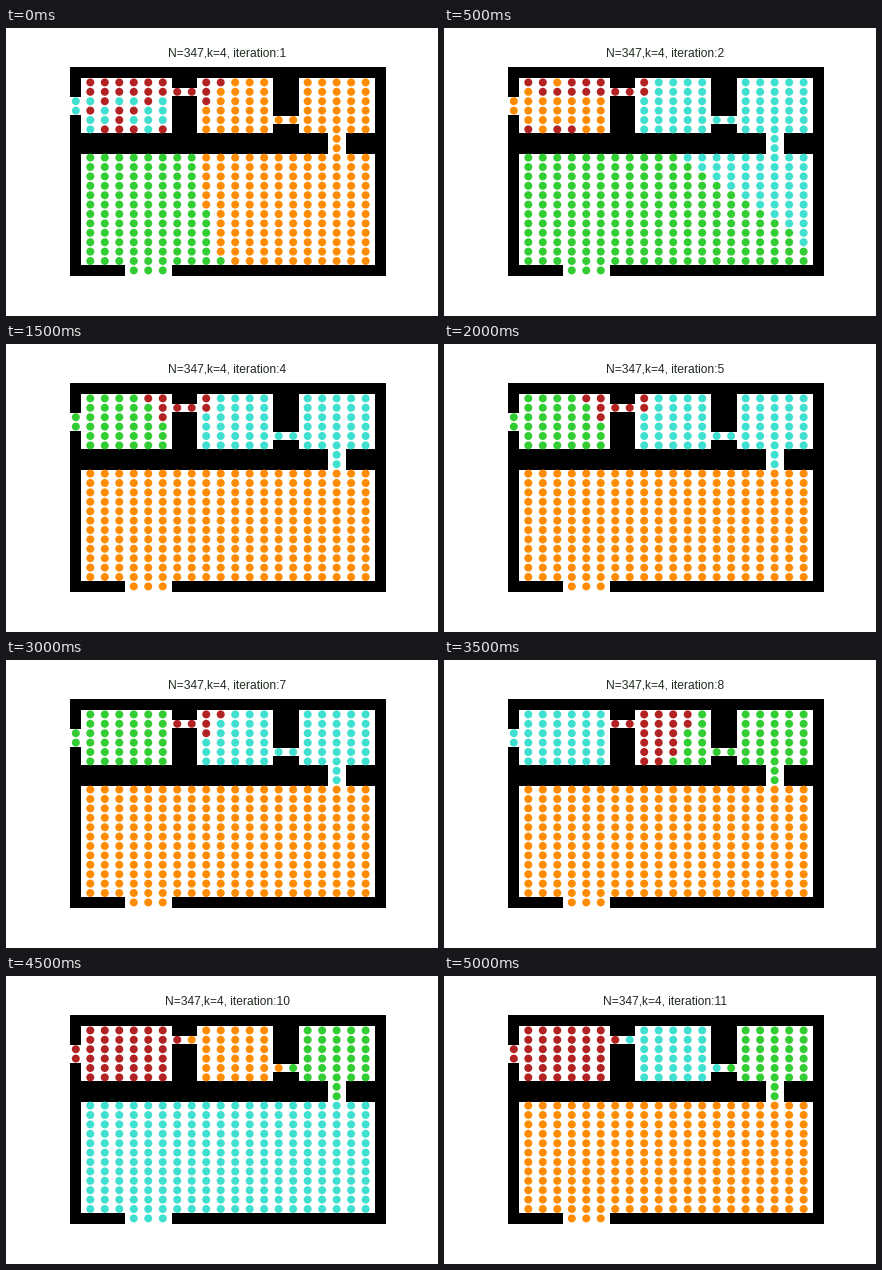
These frames come from a looping animation (432x288 px, 5500 ms). A matplotlib script:

```python
import numpy as np
import matplotlib.pyplot as plt
from matplotlib.animation import FuncAnimation
from matplotlib.patches import Rectangle

W, H, DPI = 432, 288, 72
INTERVAL = 500
COLORS = {"R": "firebrick", "O": "darkorange", "T": "turquoise", "G": "limegreen"}

# Colours per iteration: left room, middle, right room, hall
LABELS = ["TROG", "ORTG", "GRTO", "GRTO", "GRTO", "RGTO",
          "GRTO", "TRGO", "RGTO", "ROGT", "RTGO"]

WALL = (64, 39, 380, 248)
# Left, top, right, bottom
OPENINGS = [
    (75, 50, 166, 105), (191, 50, 267, 105), (293, 50, 369, 105),   # rooms
    (75, 126, 369, 237),                                            # hall
    (166, 60, 191, 68), (267, 88, 293, 96), (322, 105, 340, 126),   # passages
    (64, 69, 75, 87), (119, 237, 166, 248),                         # doors
]


def free(x, y):
    return any(x0 < x < x1 and y0 < y < y1 for x0, y0, x1, y1 in OPENINGS)


def place(c, r):
    return 84.3 + 14.49 * c, 54.4 + 9.4 * r


# Grid cells that lie on open floor
cells = np.array([(c, r) for r in range(21) for c in range(-1, 20)
                  if free(*place(c, r))])
col, row = cells.T


def clusters(n):
    """Cluster of every point: 0 left, 1 middle, 2 right, 3 hall."""
    # Slanted borders between clusters drift with the iteration
    left = np.interp(n, [1, 3, 5, 7, 9], [5.1, 3.9, 3.9, 5.1, 5.6])
    right = np.interp(n, [1, 3, 5, 7, 9, 10], [9.3, 8.5, 8.5, 9.3, 14.5, 14.9])
    hall = np.interp(n, [1, 3, 4], [7.05, 14.7, 20])
    slope = np.interp(n, [1, 3], [0.185, 1.6])

    k = np.where(col < left + 0.45 * row, 0, 1)
    # Early on, the left room is still mixed, mostly in its top rows
    stray = max(0, 1 - 0.25 * (n - 1)) if n < 4 else 0
    chance = np.where(row < 2, stray, 0.4 * stray ** 2)
    k[(col < 6) & (np.random.default_rng(n).random(len(col)) < chance)] = 1

    k[col >= right - 0.45 * row] = 2
    in_hall = row >= 8
    k[in_hall] = np.where(col > hall + slope * (row - 8), 2, 3)[in_hall]
    return k


plt.rcParams["font.family"] = "Liberation Sans"
fig = plt.figure(figsize=(W / DPI, H / DPI), dpi=DPI, facecolor="white")
ax = fig.add_axes([0, 0, 1, 1])
ax.set(xlim=(0, W), ylim=(H, 0))
ax.axis("off")


def box(x0, y0, x1, y1, color):
    ax.add_patch(Rectangle((x0, y0), x1 - x0, y1 - y0, fc=color, lw=0))


box(*WALL, "black")
for opening in OPENINGS:
    box(*opening, "white")

dots = ax.scatter(*place(col, row), s=64, linewidths=0, zorder=3)
title = ax.text(221.4, 28.56, "", fontsize=12, color="#1f2a1f",
                ha="center", va="baseline")


def update(i):
    dots.set_facecolor([COLORS[LABELS[i][k]] for k in clusters(i + 1)])
    title.set_text(f"N={len(cells)},k={len(COLORS)}, iteration:{i + 1}")
    return dots, title


anim = FuncAnimation(fig, update, frames=len(LABELS), interval=INTERVAL,
                     repeat=True, repeat_delay=0)
plt.show()
```
